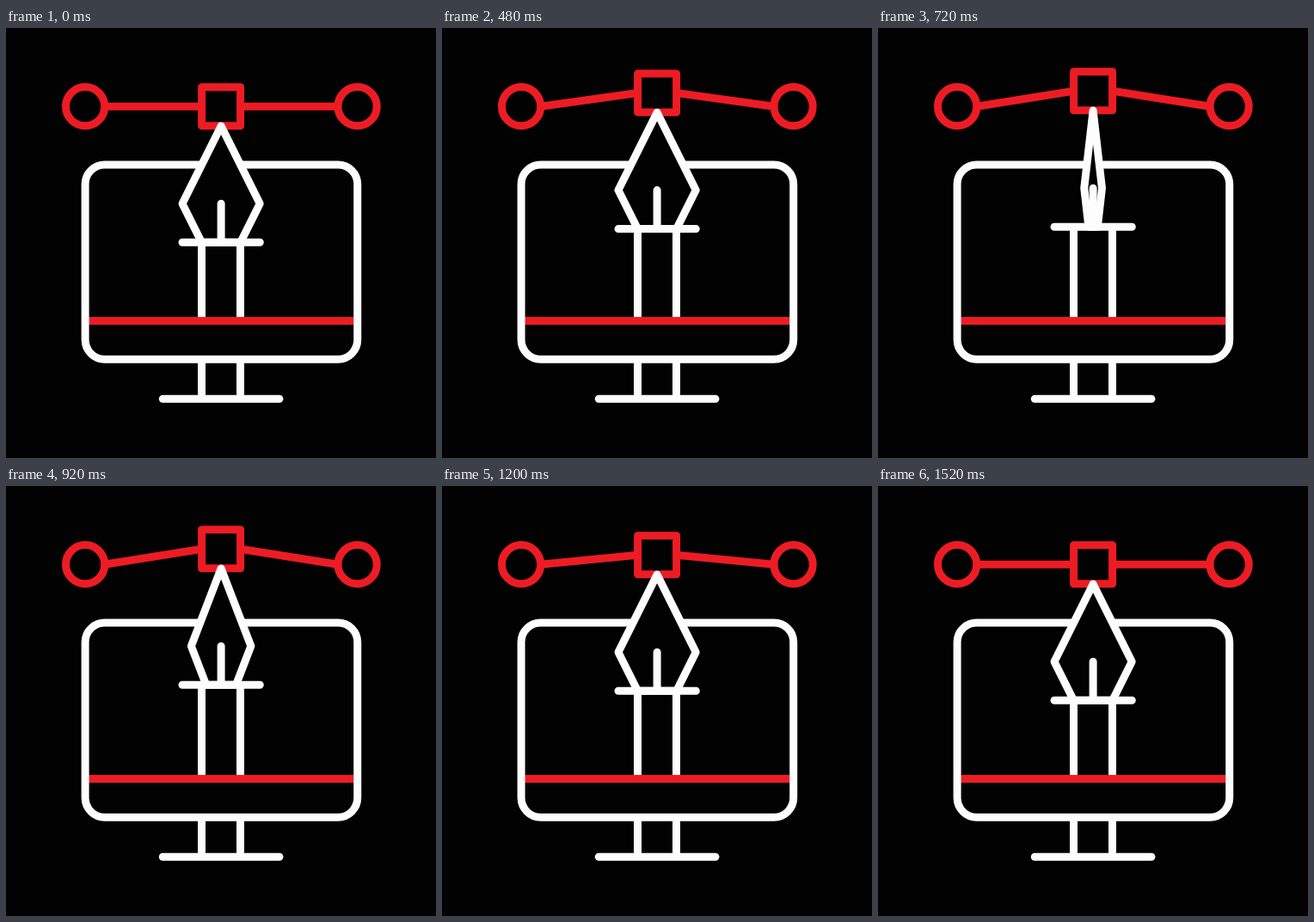
An HTML page that plays this animation: 500x500 px, repeating every 2 s.

```html
<!DOCTYPE html>
<html lang="en">
<head>
<meta charset="utf-8">
<title>Pen tool</title>
<style>
  html, body { margin: 0; width: 100%; height: 100%; overflow: hidden; background: #020202; }
  svg { display: block; width: 100vw; height: 100vh; }
  .ink { fill: none; stroke: #fdfdfd; stroke-width: 9; stroke-linecap: round; stroke-linejoin: round; }
  .red { stroke: #ed1c24; }
  .flat { stroke-linecap: butt; }
  #nib { fill: #020202; }
</style>
</head>
<body>
<svg viewBox="0 0 500 500">
  <!-- monitor -->
  <path class="ink flat" id="pillars"/>
  <path class="ink flat" d="M227.5 385V431M272.5 385V431"/>
  <path class="ink" d="M182.3 431.2H317.9"/>
  <path class="ink red flat" d="M92 340.4H409"/>
  <rect class="ink" x="92.1" y="159" width="316.6" height="226.2" rx="22.6"/>

  <!-- handles -->
  <path class="ink red flat" id="arms"/>
  <circle class="ink red" cx="92.1" cy="91.2" r="22.6"/>
  <circle class="ink red" cx="408.6" cy="91.2" r="22.6"/>

  <!-- pen -->
  <g id="pen">
    <rect class="ink red" x="227.6" y="68.7" width="45" height="45"/>
    <path class="ink" id="nib"/>
    <path class="ink" d="M250.1 204.2V249M205 249.2H295.3"/>
  </g>
</svg>
<script>
  const LOOP = 2000, STEP = 40, LIFT = 18, MID = 250.1;
  const [pillars, arms, pen, nib] =
    ['pillars', 'arms', 'pen', 'nib'].map(id => document.getElementById(id));

  // cubic-bezier(.7, 0, .3, 1), solved by bisection
  function ease(p) {
    if (p <= 0) return 0;
    if (p >= 1) return 1;
    let lo = 0, hi = 1, s = 0.5;
    for (let i = 0; i < 24; i++) {
      s = (lo + hi) / 2;
      const x = 2.1 * s * (1 - s) ** 2 + 0.9 * s * s * (1 - s) + s ** 3;
      if (x < p) lo = s; else hi = s;
    }
    return s * s * (3 - 2 * s);
  }

  const ramp = (t, from, to) => ease((t - from) / (to - from));

  function draw(t) {
    const lift = LIFT * (ramp(t, 80, 680) - ramp(t, 920, 1520));
    const open = 1 - ramp(t, 600, 800) + ramp(t, 800, 1000);
    const wide = 45.1 * open, base = 22.6 * open;

    pen.setAttribute('transform', `translate(0 ${-lift})`);
    nib.setAttribute('d', `M${MID} 113.9L${MID - wide} 204.2L${MID - base} 249.2` +
      `H${MID + base}L${MID + wide} 204.2Z`);
    pillars.setAttribute('d', `M227.5 ${249.2 - lift}V340M272.5 ${249.2 - lift}V340`);
    arms.setAttribute('d', `M114.7 91.2L227.6 ${91.2 - lift}M386 91.2L272.6 ${91.2 - lift}`);
  }

  // poses are held for one step each
  function tick(now) {
    draw(Math.floor((now % LOOP) / STEP) * STEP);
    requestAnimationFrame(tick);
  }

  draw(0);
  requestAnimationFrame(tick);
</script>
</body>
</html>
```
